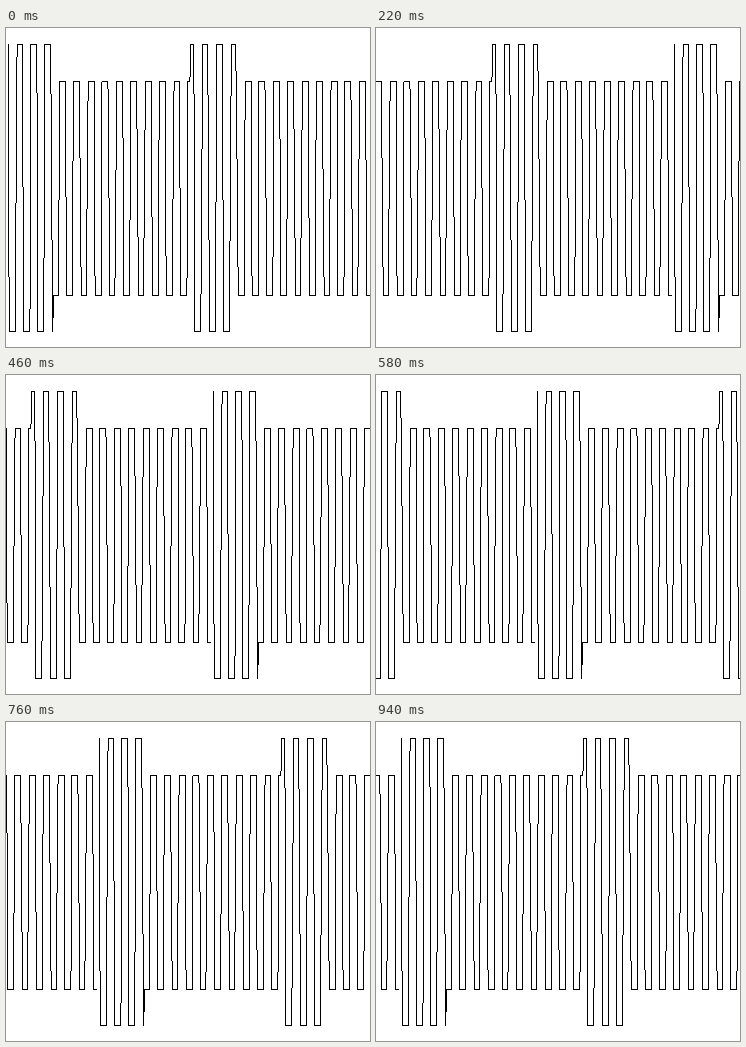
These frames come from a looping animation (364 by 319 pixels, 1000 ms). An HTML page with a canvas:

```html
<!DOCTYPE html>
<html lang="en">
<head>
<meta charset="utf-8">
<title>Scrolling square wave</title>
<style>
  html, body { margin: 0; width: 100%; height: 100%; overflow: hidden; background: #fff; }
  canvas { display: block; width: 364px; height: 319px; image-rendering: pixelated; }
</style>
</head>
<body>
<canvas id="stage" width="364" height="319"></canvas>
<script>
const W = 364, H = 319, LOOP = 1000, STEPS = 16, HOLD = 100, STEP = 60;

// Sampled signal: a square wave whose amplitude grows during periodic bursts
const SAMPLES = 367, LEFT = 1.7, PITCH = 0.9874;
const HALF = 7.2335, PHASE = 51.01, RAMP = 0.435;
const BURST_EVERY = 185, BURST_LENGTH = 46;
const MIDDLE = 160, LOUD = [16, 303], QUIET = [53, 267];

const stage = document.getElementById('stage').getContext('2d');
const tile = document.createElement('canvas');
tile.width = W;
tile.height = H;
const pen = tile.getContext('2d');

// One-pixel line without antialiasing
function line(x0, y0, x1, y1) {
  const n = Math.max(Math.abs(x1 - x0), Math.abs(y1 - y0), 1);
  for (let i = 0; i <= n; i++) {
    const x = Math.round(x0 + (x1 - x0) * i / n);
    const y = Math.round(y0 + (y1 - y0) * i / n);
    pen.fillRect(x, y, 1, 1);
  }
}

// Height of sample n; a sample that falls on a flank lies halfway
function level(n) {
  const t = n - PHASE;
  const half = Math.floor(t / HALF);
  if (t - half * HALF <= RAMP) return MIDDLE;
  const [high, low] = n % BURST_EVERY < BURST_LENGTH ? LOUD : QUIET;
  return half % 2 === 0 ? high : low;
}

for (let n = 1; n < SAMPLES; n++) {
  const x = LEFT + PITCH * n;
  line(x - PITCH, level(n - 1), x, level(n));
}

function draw(t) {
  const step = t < HOLD ? 0 : 1 + Math.floor((t - HOLD) / STEP);
  const shift = Math.round(step * W / STEPS);
  stage.fillStyle = '#fff';
  stage.fillRect(0, 0, W, H);
  stage.drawImage(tile, -shift, 0);
  stage.drawImage(tile, W - shift, 0);
}

const start = performance.now();
function tick() {
  draw((performance.now() - start) % LOOP);
  requestAnimationFrame(tick);
}
tick();
</script>
</body>
</html>
```
